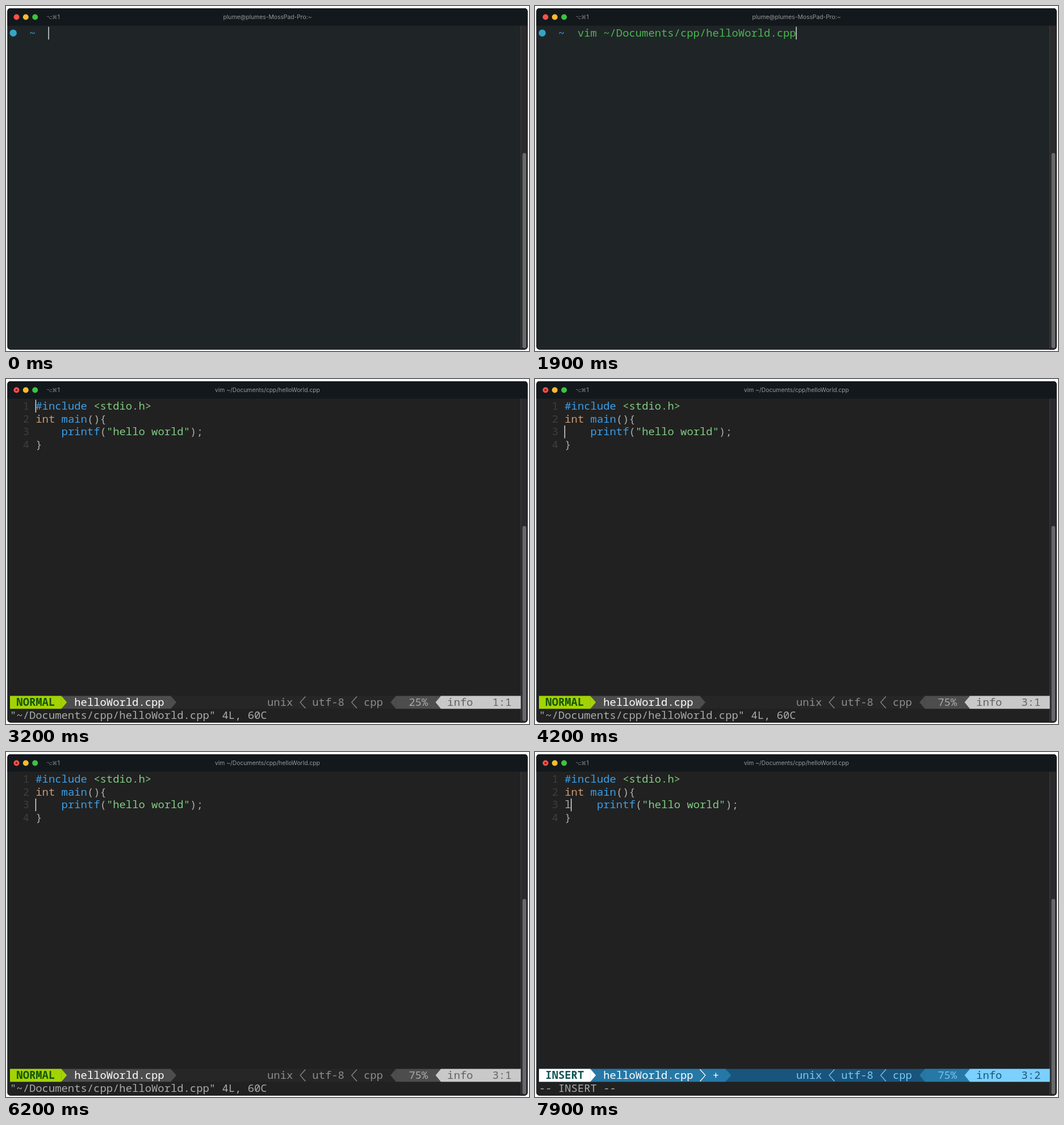
Animation, 921 px wide and 608 px high, one loop 8000 ms. Source, as an HTML page:

```html
<!DOCTYPE html>
<html lang="en">
<head>
<meta charset="utf-8">
<title>Terminal</title>
<style>
  html, body { margin: 0; width: 100%; height: 100%; overflow: hidden; background: #fff; }
  svg { display: block; width: 921px; height: 608px; }
  text { white-space: pre; }
  .mono { font: 18.87px "Noto Sans Mono", "DejaVu Sans Mono", monospace; }
  .ui { font: 10.3px Inter, Roboto, sans-serif; fill: #96999b; }
  .keys { font: 9px "DejaVu Sans", sans-serif; fill: #7d8183; }
</style>
</head>
<body>
<svg viewBox="0 0 921 608">
  <defs><clipPath id="frame"><rect x="2.5" y="4" width="916" height="601.5" rx="5"/></clipPath></defs>
  <g clip-path="url(#frame)">
    <rect width="921" height="608" fill="#1f2527"/>
    <rect width="921" height="34.7" fill="#13181c"/>
    <rect x="906.5" y="34.7" width="13" height="574" fill="#2a2a2d"/>
    <rect x="906" y="34.7" width="1" height="574" fill="#3b3c3f"/>
    <rect x="909.5" y="259" width="6.6" height="344" rx="3.3" fill="#68696b"/>
    <circle cx="18.5" cy="19.5" r="5" fill="#f6524c"/>
    <circle cx="34.8" cy="19.5" r="5" fill="#f9bb2e"/>
    <circle cx="51.2" cy="19.5" r="5" fill="#3ac440"/>
    <circle id="busy" cx="18.5" cy="19.5" r="1.7" fill="#7c1512"/>
    <text class="keys" x="71" y="22.8">⌥⌘<tspan class="ui" fill="#7d8183">1</tspan></text>
    <text class="ui" id="title" x="460.5" y="23" text-anchor="middle"></text>
    <g id="screen" class="mono"></g>
    <rect id="cursor" width="1.4" height="22.4" fill="#e4e4e4"/>
  </g>
  <rect x="3" y="4.5" width="915" height="600.5" rx="5" fill="none" stroke="#17171d"/>
</svg>
<script>
const LOOP = 8000;
const CELL = 11.325, ROW = 22.7, LEFT = 7, TOP = 36.6, RIGHT = 906.5;
const FILE = "~/Documents/cpp/helloWorld.cpp";
const COMMAND = "vim " + FILE;

const BLUE = "#3a9fe9", GREEN = "#7fcb82", TAN = "#c99a72", GRAY = "#a9abab";

const THEMES = {
  NORMAL: {
    mode: "#a3d304", modeText: "#16540a", file: "#4d4d4d", mid: "#262626", midText: "#8c8c8c",
    percentText: "#a8a8a8", info: "#c9c9c9", infoText: "#626262"
  },
  INSERT: {
    mode: "#ffffff", modeText: "#125457", file: "#2678a6", mid: "#19547c", midText: "#78c8f4",
    percentText: "#76c2ec", info: "#7bd0ff", infoText: "#17567a"
  }
};

// Each step changes part of the state from its start time on.
const STEPS = [
  [0, { app: "shell", typed: "" }],
  [500, { typed: COMMAND }],
  [2300, { app: "vim", mode: "NORMAL", line: 1, added: "" }],
  [3900, { line: 2 }],
  [4100, { line: 3 }],
  [5000, { line: 2 }],
  [5900, { line: 3 }],
  [6500, { mode: "INSERT" }],
  [7600, { added: "l" }]
];

const el = id => document.getElementById(id);
const colX = col => LEFT + col * CELL;
const rowY = row => TOP + row * ROW;

const text = (col, row, str, fill, extra = "") => {
  const safe = str.replace(/&/g, "&amp;").replace(/</g, "&lt;");
  return `<text x="${colX(col)}" y="${rowY(row) + 17.3}" fill="${fill}" ${extra}>${safe}</text>`;
};

// Draws [string, colour] runs one after another.
const runs = (col, row, parts) => parts.map(([str, fill]) => {
  const out = text(col, row, str, fill);
  col += str.length;
  return out;
}).join("");

const BAR = 23, BAR_TOP = rowY(BAR) - 0.2, BAR_MID = BAR_TOP + ROW / 2, BAR_END = BAR_TOP + ROW;

const band = (x1, x2, fill) =>
  `<rect x="${x1}" y="${BAR_TOP}" width="${x2 - x1}" height="${ROW}" fill="${fill}"/>`;
const arrow = (base, tip, fill) =>
  `<path d="M${base} ${BAR_TOP}L${tip} ${BAR_MID}L${base} ${BAR_END}z" fill="${fill}"/>`;
const chevron = (base, tip, stroke) =>
  `<path d="M${base} ${BAR_TOP + 1}L${tip} ${BAR_MID}L${base} ${BAR_END - 1}" fill="none" stroke="${stroke}" stroke-width="1.3"/>`;

function statusBar({ mode, line, added }) {
  const c = THEMES[mode];
  const fileEnd = colX(added ? 29 : 25);
  const modified = added
    ? chevron(colX(25) + 0.5, colX(25) + 9.8, "#fff") + text(27, BAR, "+", "#fff") : "";
  return [
    band(LEFT, RIGHT, c.mid),
    band(LEFT, fileEnd, c.file), arrow(fileEnd - 0.2, fileEnd + 10, c.file),
    band(LEFT, colX(8), c.mode), arrow(colX(8) - 0.2, colX(8) + 9.6, c.mode),
    text(1, BAR, mode, c.modeText, 'font-weight="700"'),
    text(10, BAR, "helloWorld.cpp", "#fff"), modified,
    text(40, BAR, "unix", c.midText),
    chevron(colX(46) - 0.6, colX(45) + 1.5, c.midText),
    text(47, BAR, "utf-8", c.midText),
    chevron(colX(54) - 0.6, colX(53) + 1.5, c.midText),
    text(55, BAR, "cpp", c.midText),
    band(colX(60), RIGHT, c.file), arrow(colX(60) + 0.2, colX(59) + 2, c.file),
    text(62, BAR, line * 25 + "%", c.percentText),
    band(colX(67), RIGHT, c.info), arrow(colX(67) + 0.2, colX(66) + 2, c.info),
    text(68, BAR, "info", c.infoText),
    text(75, BAR, `${line}:${added.length + 1}`, c.infoText)
  ].join("");
}

function vimScreen(state) {
  const { mode, added } = state;
  const code = [
    [["#include ", BLUE], ["<stdio.h>", GREEN]],
    [["int ", TAN], ["main", BLUE], ["(){", GRAY]],
    [[added, GRAY], ["    ", GRAY], ["printf", BLUE], ["(", GRAY], ['"hello world"', GREEN], [");", GRAY]],
    [["}", GRAY]]
  ];
  const lines = code.map((parts, i) => text(2, i, String(i + 1), "#3e3e3e") + runs(4, i, parts));
  const message = mode === "INSERT" ? "-- INSERT --" : `"${FILE}" 4L, 60C`;
  return `<rect x="${LEFT - 0.5}" y="35.5" width="${RIGHT - LEFT}" height="568.5" fill="#212121"/>`
    + lines.join("") + statusBar(state) + text(0, 24, message, GRAY);
}

const shellScreen = ({ typed }) =>
  `<circle cx="12.7" cy="47.7" r="6.2" fill="#35a5c6"/>`
  + text(3, 0, "~", "#36a4cc") + text(6, 0, typed, "#4db553");

function draw(state) {
  const vim = state.app === "vim";
  el("screen").innerHTML = vim ? vimScreen(state) : shellScreen(state);
  el("title").textContent = vim ? COMMAND : "plume@plumes-MossPad-Pro:~";
  el("busy").setAttribute("visibility", vim ? "visible" : "hidden");
  const col = vim ? 4 + state.added.length : 6 + state.typed.length;
  const row = vim ? state.line - 1 : 0;
  el("cursor").setAttribute("x", colX(col) - 0.6);
  el("cursor").setAttribute("y", rowY(row));
}

let shown = 0;
function update(now) {
  const t = now % LOOP;
  const count = STEPS.filter(([start]) => start <= t).length;
  if (count !== shown) {
    shown = count;
    draw(Object.assign({}, ...STEPS.slice(0, count).map(([, change]) => change)));
  }
}

const begin = performance.now();
function tick() {
  update(performance.now() - begin);
  requestAnimationFrame(tick);
}
tick();
</script>
</body>
</html>
```
